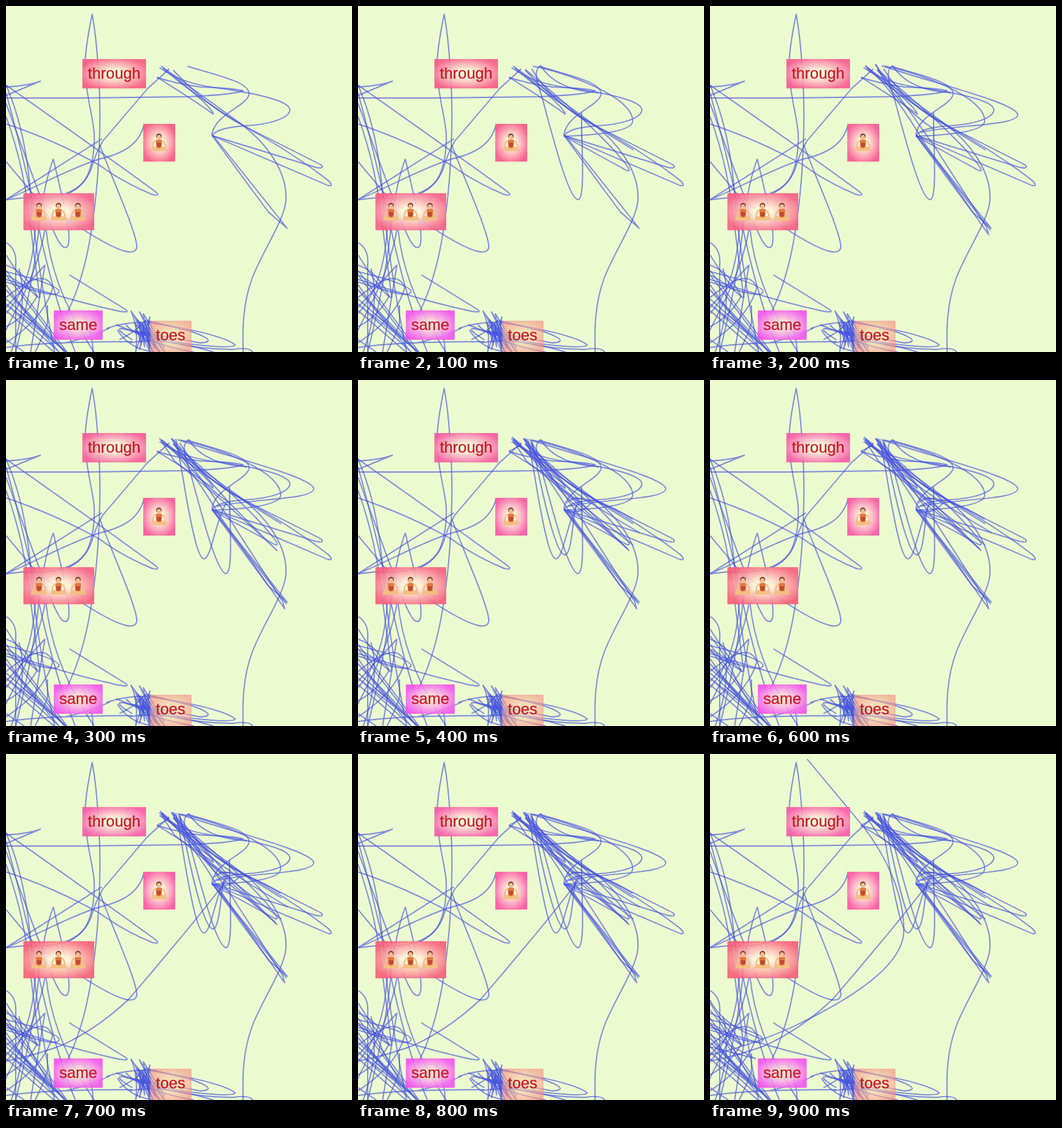
These frames come from a looping animation (534 by 534 pixels, 1 s). An HTML page:

```html
<!DOCTYPE html>
<html lang="en">
<head>
<meta charset="utf-8">
<title>Scribbles</title>
<style>
html, body { margin: 0; width: 100%; height: 100%; overflow: hidden; background: #ecfbcf; }
svg { display: block; width: 100%; height: 100%; }
#lines path { fill: none; stroke: #4450e0; stroke-opacity: .64; stroke-width: 1.9; stroke-linejoin: round; }
text { font: 24px "Liberation Sans", Arial, sans-serif; text-anchor: middle; fill: #cc1a26; stroke: #cc1a26; stroke-width: .35; }
.box { stroke: #e0587a; stroke-opacity: .4; stroke-dasharray: 2 2; }
</style>
</head>
<body>
<svg viewBox="0 0 534 534">
  <defs>
    <g id="sitter">
      <path d="M-13 12Q-9 8 0 9Q9 8 13 12L11 14H-11Z" fill="#f3c080"/>
      <path d="M-6-2Q-10 3-10 9L-4 8M6-2Q10 3 10 9L4 8" fill="none" stroke="#f2bd88" stroke-width="2.2"/>
      <path d="M-5-3Q0-5 5-3L4 8Q0 11-4 8Z" fill="#e07a40"/>
      <path d="M-4 2Q0 0 4 2L3 7Q0 9-3 7Z" fill="#c44a28"/>
      <circle cy="-9" r="4.3" fill="#7a4436"/>
      <ellipse cy="-7.2" rx="3.3" ry="3.8" fill="#f3bd8c"/>
    </g>
  </defs>
  <g id="lines"></g>
  <g id="boxes"></g>
  <use href="#sitter" x="236" y="210"/>
  <use href="#sitter" x="51" y="317"/>
  <use href="#sitter" x="81" y="317"/>
  <use href="#sitter" x="111" y="317"/>
  <text x="167" y="112">through</text>
  <text x="111.5" y="500">same</text>
  <text x="254" y="516">toes</text>
</svg>
<script>
const $ = id => document.getElementById(id);

// [first step on which it shows, path]
const strokes = [
  // tall spike and long sweeps
  [0, "M92 478C120 425 132 360 139 290C146 220 146 150 143 110Q140 50 133 13Q121 70 122 100C124 140 134 170 136 195Q138 235 125 263C110 292 65 300 28 296L0 299"],
  [0, "M0 142H118L280 140Q350 137 366 131Q355 127 300 125Q258 119 233 110"],
  [0, "M252 97L218 128L149 209Q138 228 132 250Q122 278 95 290"],
  [0, "M213 183C205 217 175 229 145 236C100 250 50 278 0 299L148 205"],
  [0, "M0 125Q35 123 53 116L0 138"],
  [0, "M0 122Q120 206 230 286Q240 294 226 291Q180 272 145 246Q75 207 0 182"],
  [0, "M145 215C165 270 200 345 202 371C201 386 180 383 127 350L50 300L0 240"],
  [0, "M73 236Q58 275 50 350T15 534M73 236C84 285 104 355 95 371C87 379 78 358 70 340Q40 260 0 150"],
  // left edge
  [0, "M0 122Q30 190 38 290T75 534"],
  [0, "M0 134Q24 220 50 340T107 534"],
  [0, "M0 170Q25 240 34 310T52 450"],
  [0, "M60 346Q50 400 20 460T0 500"],
  [0, "M45 346Q40 430 0 475M62 346Q72 440 136 534M0 365Q17 375 15 400V534"],
  // lower left tangle
  [0, "M98 415L184 468Q194 475 170 470Q100 455 0 422"],
  [0, "M0 410Q82 430 82 441Q80 449 50 441L0 426"],
  [0, "M0 384Q35 440 50 450Q30 430 0 415Q50 480 90 534"],
  [0, "M0 408L94 534L0 460L82 534L0 438L88 530L0 452"],
  [0, "M0 470L74 534M0 430Q40 490 92 534L30 478"],
  [0, "M0 450Q60 400 72 435Q60 480 0 520M0 400Q30 410 48 448Q30 480 0 495"],
  [0, "M20 405Q35 460 8 534M0 465L60 400L38 534M64 462V490Q55 515 45 534"],
  [0, "M0 527Q60 518 195 518M90 520Q130 512 160 497M0 515L28 534M120 478Q135 510 134 534"],
  // lower middle tangle
  [0, "M193 472L245 534L206 472L236 534L198 478L222 534L212 475L245 528"],
  [0, "M193 470Q205 500 200 534L215 487L206 530L222 480Q215 520 228 534"],
  [0, "M198 488L232 530M203 485L226 530M208 488L238 534M200 500L220 520M205 492L230 524"],
  [0, "M200 490L208 520L206 488L214 526L211 490L222 530L216 492L230 528L219 490"],
  [0, "M155 498Q180 488 218 488Q330 505 354 523Q350 530 270 520L180 498Q165 497 195 515"],
  [0, "M170 492Q260 530 350 530Q375 526 381 534M175 515Q205 500 215 485L285 502Q330 518 300 520L190 500"],
  [0, "M172 500Q190 530 230 534M185 492Q210 520 290 534M190 520Q240 510 320 534"],
  // right-hand cluster
  [0, "M280 93C330 108 378 118 375 137C370 155 322 168 318 198L434 343L405 318L318 200"],
  [0, "M318 200C325 190 345 187 367 185C410 183 440 172 438 159C434 145 380 134 330 127Q270 120 237 95"],
  [0, "M233 110Q290 145 320 167Q318 155 240 93L367 185L486 245Q493 252 478 249L318 200"],
  [0, "M318 200L497 277Q507 279 497 269Q440 225 367 185Q290 138 242 96"],
  [0, "M258 99Q310 155 365 184C400 210 435 255 432 300C430 330 395 380 380 420C365 460 365 500 366 534"],
  [1, "M282 92Q268 98 283 137C300 200 325 299 340 299C351 295 345 220 345 165V207V186"],
  [1, "M270 93C320 102 425 140 424 178C422 194 370 199 318 201L415 254Q424 257 410 240Q370 190 258 98"],
  [1, "M282 92Q305 130 372 134M268 97Q300 150 367 186L425 222"],
  [2, "M265 92C340 118 475 150 475 168C473 185 380 183 325 195"],
  [2, "M240 92Q280 125 330 210L430 353L427 342L350 222Q300 150 255 90"],
  [2, "M318 200L433 346M256 90Q280 145 345 190"],
  [3, "M262 91Q270 130 278 180C288 235 297 277 306 276C318 272 322 220 340 190"],
  [3, "M237 90L260 125Q330 180 418 263L345 190L258 92"],
  [4, "M268 92C285 180 305 271 320 270C330 266 331 220 336 195"],
  [4, "M266 94Q290 160 350 205L416 260M238 88Q290 150 400 215L435 236M330 183Q370 180 424 215"],
  [4, "M233 110L252 100L240 90M322 190Q335 175 360 190Q340 210 325 200M258 90L310 165L425 255"],
  [5, "M0 445Q40 480 64 508M0 418L50 450"],
  [6, "M0 395Q25 425 35 450T75 520"],
  [7, "M340 195Q310 235 270 283T190 378Q140 425 85 450Q45 465 0 474"],
  [9, "M150 8L235 110C283 172 300 230 299 275C297 330 210 382 130 420Q65 450 0 464"],
  [9, "M0 380Q20 420 80 440M0 434L70 470L0 452"]
];

// x, y, width, height, centre colour, opacity, edge colour at each step
const boxes = [
  [118, 82, 98, 45, "#fffbe0", .9, f => `hsl(${345 - 3 * Math.min(f, 5)} 92% 66%)`],
  [212, 182, 49, 58, "#fff8dc", .95, f => `hsl(${344 - 3 * Math.min(f, 4)} 94% 67%)`],
  [27, 289, 109, 57, "#fff6da", .9, f => `hsl(${343 + Math.min(f, 7)} 92% 67%)`],
  [74, 470, 75, 45, "#fce6dc", .88, () => "#f24cf2"],
  [223, 486, 63, 50, "#f8dcb4", .62, () => "#f98c80"]
];

$("lines").innerHTML = strokes.map(([, d]) => `<path d="${d}"/>`).join("");
$("boxes").innerHTML = boxes.map(([x, y, w, h, centre, alpha], i) =>
  `<radialGradient id="g${i}" r=".62"><stop offset=".2" stop-color="${centre}"/><stop id="edge${i}" offset=".92"/></radialGradient>
   <rect class="box" x="${x}" y="${y}" width="${w}" height="${h}" fill="url(#g${i})" fill-opacity="${alpha}"/>`).join("");

const paths = [...$("lines").children];
let shown = -1;

function draw(now) {
  const step = Math.floor(now / 100) % 10;
  if (step !== shown) {
    shown = step;
    paths.forEach((p, i) => p.style.display = step < strokes[i][0] ? "none" : "");
    boxes.forEach((b, i) => $("edge" + i).setAttribute("stop-color", b[6](step)));
  }
  requestAnimationFrame(draw);
}
draw(0);
</script>
</body>
</html>
```
